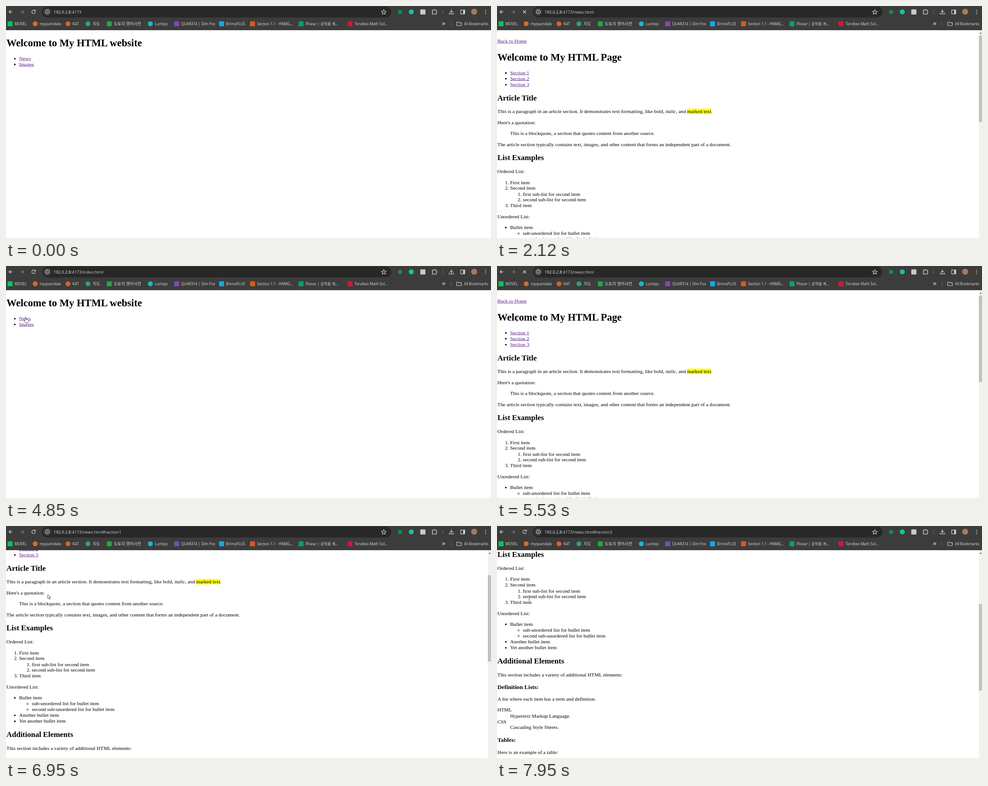
An HTML page that plays this animation: 1080x518 px, repeating every 8 s.

```html
<!DOCTYPE html>
<html lang="en">
<head>
<meta charset="utf-8">
<title>Browsing a small site</title>
<style>
  html, body { margin: 0; width: 100%; height: 100%; overflow: hidden; background: #fff; }
  #stage { position: absolute; left: 0; top: 0; width: 1080px; height: 518px; overflow: hidden; }
  svg { position: absolute; left: 0; top: 0; }
  svg text { font-family: "Open Sans", "Noto Sans CJK KR", "Noto Sans CJK", sans-serif; }
  #view { position: absolute; top: 54px; width: 1080px; height: 464px; overflow: hidden; }
  .page {
    position: absolute; left: .6px; top: 0; width: 1500px; display: flow-root;
    font: 16px/1.15 "Liberation Serif", "Times New Roman", serif; color: #000;
    transform-origin: 0 0;
  }
  .page a { color: #551a8b; text-decoration: underline; }
  .page p.back { margin: 25.2px 0 23.1px; }
  .page p.back + h1 { margin-top: 0; }
  #bar { position: absolute; right: 0; top: 0; width: 7.5px; height: 464px; background: #f1f1f1; }
  #bar::before {
    content: ""; position: absolute; left: 2.2px; top: 5px;
    border: 2.2px solid transparent; border-top: 0; border-bottom: 3px solid #505050;
  }
  #thumb { position: absolute; left: .5px; top: 12px; width: 7px; height: 193px; background: #c1c1c1; }
</style>
</head>
<body>
<div id="stage">
  <div id="view">
    <div class="page" id="home">
      <h1>Welcome to My HTML website</h1>
      <ul><li><a>News</a></li><li><a>Images</a></li></ul>
    </div>
    <div class="page" id="news">
      <p class="back"><a>Back to Home</a></p>
      <h1>Welcome to My HTML Page</h1>
      <ul><li><a>Section 1</a></li><li><a>Section 2</a></li><li><a>Section 3</a></li></ul>
      <h2>Article Title</h2>
      <p>This is a paragraph in an article section. It demonstrates text formatting, like bold, <i>italic</i>, and <mark>marked text</mark>.</p>
      <p>Here's a quotation:</p>
      <blockquote>This is a blockquote, a section that quotes content from another source.</blockquote>
      <p>The article section typically contains text, images, and other content that forms an independent part of a document.</p>
      <h2>List Examples</h2>
      <p>Ordered List:</p>
      <ol>
        <li>First item</li>
        <li>Second item<ol><li>first sub-list for second item</li><li>second sub-list for second item</li></ol></li>
        <li>Third item</li>
      </ol>
      <p>Unordered List:</p>
      <ul>
        <li>Bullet item<ul><li>sub-unordered list for bullet item</li><li>second sub-unordered list for bullet item</li></ul></li>
        <li>Another bullet item</li>
        <li>Yet another bullet item</li>
      </ul>
      <h2>Additional Elements</h2>
      <p>This section includes a variety of additional HTML elements:</p>
      <h3>Definition Lists:</h3>
      <p>A list where each item has a term and definition.</p>
      <dl><dt>HTML</dt><dd>Hypertext Markup Language.</dd><dt>CSS</dt><dd>Cascading Style Sheets.</dd></dl>
      <h3>Tables:</h3>
      <p>Here is an example of a table:</p>
    </div>
    <div id="bar"><div id="thumb"></div></div>
  </div>

  <svg width="1080" height="518" viewBox="0 0 1080 518">
    <rect width="1080" height="54" fill="#3c3c3c"/>
    <rect x="80" y="1" width="778" height="24.5" rx="12.2" fill="#282828"/>
    <circle cx="92" cy="13" r="9" fill="#3c3c3c"/>
    <g fill="none" stroke="#d5d5d5" stroke-width="1.25">
      <path d="M14.5 13H7M10.5 9.2L6.8 13l3.7 3.8"/>
      <path d="M32 13h7.5M36 9.2L39.7 13 36 16.8" stroke="#7b7b7b"/>
      <path id="reload" d="M65 10.8A4 4 0 1 0 65.3 14.2M65.7 8.7v3h-3"/>
      <path id="stop" d="M58 9.7l6.8 6.8m0-6.8L58 16.5"/>
      <circle cx="92" cy="13" r="4.3"/>
      <path d="M92 12.3v3M92 10.3v1.2"/>
      <path d="M841.3 8.2l1.5 3.5 3.8.3-2.9 2.5.9 3.7-3.3-2-3.3 2 .9-3.7-2.9-2.5 3.8-.3z" stroke-width="1.1"/>
      <path d="M949.3 9h3a1.5 1.5 0 0 1 3 0h3v3a1.5 1.5 0 0 1 0 3v3h-9v-3a1.5 1.5 0 0 0 0-3z"/>
      <path d="M991.8 7.5v7M988.7 11.5l3.1 3.1 3.1-3.1M987 15v2.7h9.6V15"/>
      <path d="M1012.5 8.8h9v8.8h-9z"/>
      <path d="M1003.5 36h3.8l1.3 1.4h5.4v6.3h-10.5z" stroke-width="1.1"/>
      <path d="M971.8 37l2.5 2.6-2.5 2.6m3.3-5.2l2.5 2.6-2.5 2.6"/>
      <path d="M972.5 8v10M991 35v10" stroke="#6a6a6a" stroke-width="1"/>
    </g>
    <path d="M1018 8.8h3.7v8.8h-3.7z" fill="#d5d5d5"/>
    <g fill="#d5d5d5"><circle cx="1068" cy="9" r="1"/><circle cx="1068" cy="13" r="1"/><circle cx="1068" cy="17" r="1"/></g>
    <rect x="873.5" y="9.2" width="8" height="8" fill="#12924f"/>
    <circle cx="902.5" cy="13" r="5.6" fill="#15c39a"/>
    <rect x="922.5" y="7.5" width="11.5" height="11.5" rx="1.5" fill="#c9c9c9"/>
    <circle cx="1042.5" cy="12.8" r="6.8" fill="#a8795c"/>
    <text x="106" y="16.5" font-size="9.15" fill="#f1f1f1">192.0.2.8<tspan id="rest" fill="#cdcdcd"></tspan></text>
    <g id="marks" fill="#dcdcdc"></g>
    <g id="cursor" fill="#fff" stroke="#222" stroke-width=".8" stroke-linejoin="round">
      <path id="arrow" d="M0 0v9.3l2.1-1.9 1.5 3.3 1.5-.7-1.5-3.2h2.9z"/>
      <path id="hand" d="M-1.1 1Q0-.8 1.1 1V5l4 1q1.3.4 1.2 1.7L5.6 11l-.9 2.2H0L-1.5 11l-2.1-3q.2-1.5 2.5 0z"/>
      <path id="beam" d="M-2-5q1.5 0 2 .8q.5-.8 2-.8M0-4.2v8.4M-2 5q1.5 0 2-.8q.5.8 2 .8" fill="none"/>
    </g>
  </svg>
</div>

<script>
const $ = id => document.getElementById(id);
const LOOP = 8000, SCALE = .7073;
const SEC1 = 141.5, SEC2 = 275.2;

// icon centre, icon colour, round?, label x, label, font size
const bookmarks = [
  [9, '#03c75a', 0, 19, 'MOVEL'],
  [65, '#d9692c', 1, 75, 'myquendale'],
  [138, '#d9602c', 1, 148, 'K4T'],
  [182.5, '#34a06a', 1, 193, '지도', 9.1],
  [230, '#1fa845', 0, 240, '도토리 영어사전', 9.1],
  [321.5, '#1bb5d0', 1, 331.5, 'Lumiqo'],
  [380, '#7d4bb0', 0, 390, 'QUAR314 | Dim Fox'],
  [480, '#14a9ee', 0, 490, 'BrimoPLUS'],
  [549, '#d9591c', 0, 559, 'Section 1.1 - HNMG...'],
  [657, '#0aa35c', 0, 667, 'Plovar | 공학용 계...', 8.4],
  [766, '#d8143a', 0, 776, 'Torvibex Math Sol...']
];
const label = (x, text, size = 8.15) => `<text x="${x}" y="42.7" font-size="${size}">${text}</text>`;
$('marks').innerHTML = label(1020, 'All Bookmarks') + bookmarks.map(([cx, color, round, x, text, size]) =>
  `<rect x="${cx - 5.5}" y="34.2" width="11" height="11" rx="${round ? 5.5 : .5}" fill="${color}"/>` + label(x, text, size)
).join('');

// time, value; each value holds until the next
const urls = [
  [0, ''], [1840, '/news.html'], [4330, '/index.html'], [5280, '/news.html'],
  [6070, '/news.html#section1'], [7820, '/news.html#section2']
];
const pages = [[0, 'home'], [2120, 'news'], [4470, 'home'], [5500, 'news']];
const loading = [[0, false], [1840, true], [2380, false], [4330, true], [4600, false], [5280, true], [5570, false]];
const shapes = [
  [0, ''], [430, 'arrow'], [1380, 'hand'], [2120, 'beam'], [2640, 'hand'], [3410, 'beam'],
  [3620, 'arrow'], [3960, 'hand'], [4470, 'beam'], [4700, 'hand'], [5500, 'beam'], [5660, 'hand'],
  [6130, 'arrow'], [6460, 'beam'], [6750, 'arrow'], [7410, 'hand'], [7880, 'beam']
];

// time, values; blended linearly
const path = [
  [430, 1000, 468], [1170, 83, 126], [1240, 78, 124], [1450, 30, 113], [2310, 30, 113],
  [2710, 49, 140], [2910, 49, 141], [3060, 49, 148], [3409, 49, 148], [3410, 64, 118],
  [3480, 64, 118], [3690, 54, 91], [3890, 54, 91], [4030, 49, 81], [4540, 49, 81],
  [4850, 44, 114], [4920, 44, 114], [5000, 43, 114], [5500, 43, 114], [5730, 54, 149],
  [6459, 54, 149], [6460, 57, 148], [6680, 57, 148], [6950, 93, 153], [7020, 93, 153],
  [7480, 72, 160], [7550, 71, 159], [7820, 71, 159], [7950, 72, 161]
];
const scrolls = [
  [6069, 0], [6070, SEC1], [6820, SEC1], [6950, 111], [7020, 111], [7260, 0], [7819, 0], [7820, SEC2]
];

const hold = (keys, t) => keys.findLast(k => k[0] <= t)[1];

function blend(keys, t) {
  const next = keys.findIndex(k => k[0] > t);
  if (next <= 0) return keys.at(next).slice(1);
  const a = keys[next - 1], b = keys[next];
  const f = (t - a[0]) / (b[0] - a[0]);
  return a.slice(1).map((v, i) => v + (b[i + 1] - v) * f);
}

const show = (id, on) => { $(id).style.display = on ? '' : 'none'; };

function draw(t) {
  const page = hold(pages, t), busy = hold(loading, t), shape = hold(shapes, t);
  const [scroll] = blend(scrolls, t);
  const [x, y] = blend(path, t);

  $('rest').textContent = ':4173' + hold(urls, t);
  show('home', page === 'home');
  show('news', page === 'news');
  show('bar', page === 'news');
  show('reload', !busy);
  show('stop', busy);
  for (const id of ['arrow', 'hand', 'beam']) show(id, id === shape);

  $('home').style.transform = `translateY(.5px) scale(${SCALE})`;
  $('news').style.transform = `translateY(${.5 - scroll}px) scale(${SCALE})`;
  $('thumb').style.transform = `translateY(${scroll * .394}px)`;
  $('cursor').setAttribute('transform', `translate(${x} ${y})`);
}

const start = performance.now();
function tick() {
  draw((performance.now() - start) % LOOP);
  requestAnimationFrame(tick);
}
tick();
</script>
</body>
</html>
```
